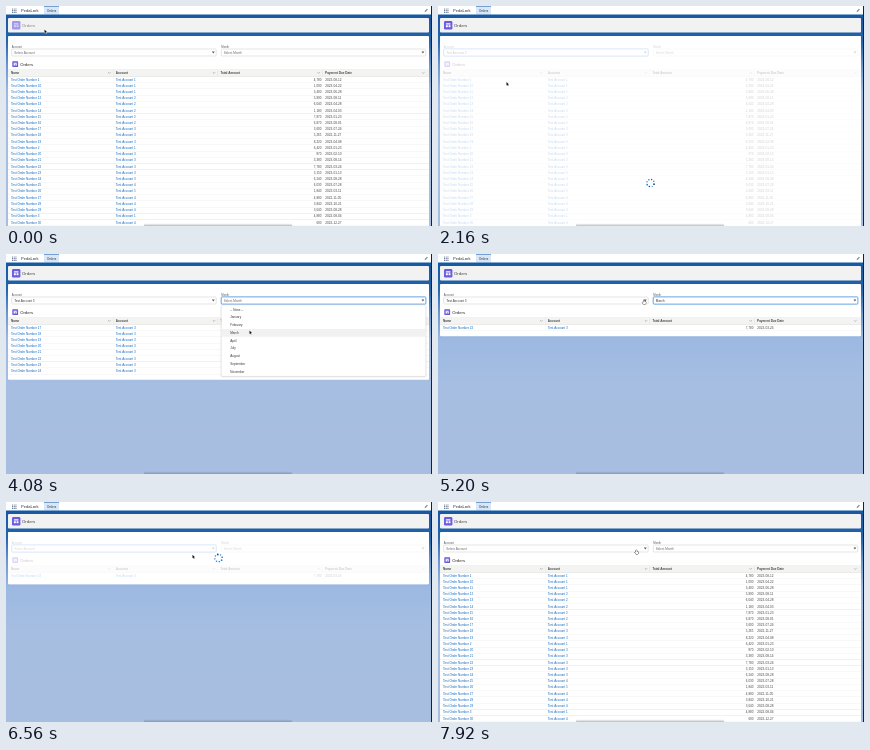
These frames come from a looping animation (426 px wide and 220 px high, 8000 ms). An HTML page with a canvas:

```html
<!DOCTYPE html>
<html lang="en">
<head>
<meta charset="utf-8">
<title>Orders</title>
<style>
  html, body { margin: 0; width: 100%; height: 100%; overflow: hidden; background: #fff; }
  canvas { display: block; width: 426px; height: 220px; }
</style>
</head>
<body>
<canvas id="stage" width="426" height="220"></canvas>
<script>
const ctx = document.getElementById('stage').getContext('2d');
const LOOP = 8000;
const FONT = '"Liberation Sans", Arial, sans-serif';
const LINK = '#0b66c0', INK = '#444', PURPLE = '#6a5cdf', LINE = '#dddbda';
const ROW = 6.22, OPTION = 7.75;

// Order numbers come sorted as text: 1, 10, 11, ..., 2, 20, ...
const amounts = [4780, 1000, 3400, 5890, 6040, 1180, 7870, 6870, 3600, 5265, 8220, 6420,
  870, 3380, 7780, 3150, 6240, 6030, 1840, 4880, 3840, 3640, 4880, 600];
const dates = ('23-08-12 23-04-22 23-06-28 23-08-11 23-04-28 23-04-03 23-01-23 23-08-01 ' +
  '23-07-24 22-11-27 23-04-08 23-01-23 23-02-10 23-08-14 23-03-24 23-01-13 23-08-28 ' +
  '23-07-28 23-03-11 22-11-05 23-10-21 23-08-28 22-08-04 22-12-27').split(' ');
const accountOf = n => n < 12 ? 1 : n < 17 ? 2 : n < 25 ? 3 : n === 26 ? 5 : 4;
const orders = Array.from({ length: 30 }, (_, i) => String(i + 1)).sort()
  .slice(0, amounts.length)
  .map((n, i) => ({
    name: 'Test Order Number ' + n,
    account: accountOf(+n),
    amount: amounts[i].toLocaleString('en-US'),
    date: '20' + dates[i]
  }));
const byAccount = orders.filter(o => o.account === 3);
const byMonth = byAccount.filter(o => o.date.slice(5, 7) === '03');

const accounts = ['-- None --', ...[1, 2, 3, 4, 5].map(n => 'Test Account ' + n)];
const months = ['-- None --', 'January', 'February', 'March', 'April', 'July',
  'August', 'September', 'November'];

// Pointer stops: time, x, y
const path = [
  [0, 38.5, 23.5], [80, 38.5, 23.5], [800, 73, 46], [1120, 73, 46], [1680, 68.5, 76],
  [2400, 68.5, 76], [2900, 220.5, 46], [3360, 220.5, 46], [3840, 243.5, 76.5],
  [4440, 243.5, 76.5], [5120, 205.5, 46], [5440, 205.5, 46], [5960, 186.5, 52.8],
  [6960, 186.5, 52.8], [7600, 198, 48], [LOOP, 198, 48]
];

const within = (t, a, b) => t >= a && t < b;
const ease = p => p * p * (3 - 2 * p);

function pointerAt(t) {
  const i = path.findIndex(p => p[0] > t);
  const [t0, x0, y0] = path[i - 1], [t1, x1, y1] = path[i];
  const p = ease((t - t0) / (t1 - t0));
  return [x0 + (x1 - x0) * p, y0 + (y1 - y0) * p];
}

function stateAt(t) {
  return {
    rows: within(t, 2480, 4400) ? byAccount : within(t, 4400, 6880) ? byMonth : orders,
    account: within(t, 1880, 6240) ? 'Test Account 3' : 'Select Account',
    month: within(t, 4160, 6240) ? 'March' : 'Select Month',
    focus: within(t, 1040, 3280) || within(t, 5360, 7360) ? 'account'
      : within(t, 3280, 5360) ? 'month' : '',
    open: within(t, 1040, 1880) || within(t, 5360, 6240) ? 'account'
      : within(t, 3280, 4160) ? 'month' : '',
    loading: within(t, 1880, 2480) || within(t, 4160, 4400) || within(t, 6240, 6880)
  };
}

function rect(x, y, w, h, fill, r = 0, stroke, weight = 0.4) {
  ctx.beginPath();
  ctx.roundRect(x, y, w, h, r);
  if (fill) { ctx.fillStyle = fill; ctx.fill(); }
  if (stroke) { ctx.strokeStyle = stroke; ctx.lineWidth = weight; ctx.stroke(); }
}

// Type is set large and scaled down so tiny sizes keep true widths.
function text(str, x, y, size, color, { bold = false, align = 'left' } = {}) {
  ctx.save();
  ctx.translate(x, y);
  ctx.scale(0.1, 0.1);
  ctx.font = `${bold ? 'bold ' : ''}${size * 10}px ${FONT}`;
  ctx.textAlign = align;
  ctx.fillStyle = color;
  ctx.fillText(str, 0, 0);
  ctx.restore();
}

function polygon(points, fill, stroke, weight = 0.5) {
  ctx.beginPath();
  points.forEach(([x, y]) => ctx.lineTo(x, y));
  ctx.closePath();
  if (stroke) { ctx.strokeStyle = stroke; ctx.lineWidth = weight; ctx.stroke(); }
  ctx.fillStyle = fill;
  ctx.fill();
}

function icon(x, y, s, color) {
  rect(x, y, s, s, color, s * 0.15);
  rect(x + s * 0.22, y + s * 0.27, s * 0.56, s * 0.16, '#fff', s * 0.05);
  rect(x + s * 0.22, y + s * 0.5, s * 0.24, s * 0.24, '#fff', s * 0.05);
  rect(x + s * 0.54, y + s * 0.5, s * 0.24, s * 0.24, '#fff', s * 0.05);
}

function backdrop() {
  const g = ctx.createLinearGradient(0, 0, 0, 220);
  [[0, '#15549c'], [0.16, '#2264ad'], [0.27, '#6c96cf'], [0.39, '#9db9e2'],
    [0.6, '#a6bee1'], [1, '#a8bee0']].forEach(([p, c]) => g.addColorStop(p, c));
  rect(0, 0, 426, 220, g);
}

function navBar() {
  rect(0, 0, 426, 9, '#fff');
  for (let i = 0; i < 9; i++) {
    rect(6 + (i % 3) * 1.7, 2.4 + Math.floor(i / 3) * 1.7, 1.1, 1.1, '#5f6f8c', 0.5);
  }
  text('PedaLark', 15, 6, 4.1, '#333');
  rect(38, 0, 15, 8.5, '#d8e6f6');
  rect(38, 0, 15, 0.7, '#4b83c8');
  text('Orders', 41, 5.6, 3, '#333');
  polygon([[418.6, 6], [418.9, 4.9], [421, 2.8], [421.8, 3.6], [419.7, 5.7]], '#777');
  rect(0, 8.5, 426, 0.8, '#0d5aa8');
}

function pageHeader(t) {
  rect(2, 12, 421, 14.5, '#f3f2f3', 1);
  ctx.globalAlpha = t < 80 ? 0.6 : 1;
  icon(6, 15, 8.4, PURPLE);
  text('Orders', 16, 20.9, 4.3, '#3e3e3c');
  ctx.globalAlpha = 1;
}

function select(x, label, value, focused) {
  text(label, x, 41.8, 2.8, '#555');
  if (focused) rect(x, 43, 204.5, 7, null, 1, 'rgba(60,140,225,.35)', 1.4);
  rect(x, 43, 204.5, 7, '#fff', 1, focused ? '#1b76d0' : '#cbc9c8', 0.5);
  text(value, x + 2.5, 47.5, 3.1, value.startsWith('Select') ? '#666' : '#333');
  polygon([[x + 200.2, 45.6], [x + 203, 45.6], [x + 201.6, 47.4]], '#555');
}

function table(rows) {
  rect(2, 63.6, 421, 6.6, '#f3f3f2');
  rect(2, 63.4, 421, 0.4, LINE);
  rect(2, 70, 421, 0.4, LINE);
  ['Name', 'Account', 'Total Amount', 'Payment Due Date'].forEach((title, i) => {
    const x = 5 + i * 104.7;
    text(title, x, 67.9, 3.05, INK, { bold: true });
    ctx.beginPath();
    ctx.moveTo(x + 97.2, 66.3);
    ctx.lineTo(x + 98.3, 67.4);
    ctx.lineTo(x + 99.4, 66.3);
    ctx.strokeStyle = '#777';
    ctx.lineWidth = 0.5;
    ctx.stroke();
    if (i < 3) rect(x + 102, 63.6, 0.3, 6.6, LINE);
  });
  rows.forEach((o, i) => {
    const y = 74.5 + i * ROW;
    text(o.name, 5, y, 3.05, LINK);
    text('Test Account ' + o.account, 109.7, y, 3.05, LINK);
    text(o.amount, 315.5, y, 3.05, INK, { align: 'right' });
    text(o.date, 319.2, y, 3.2, INK);
    rect(2, y + 2, 421, 0.3, '#e4e3e2');
  });
}

function menu(x, items, pointerY) {
  const h = items.length * OPTION + 1.6;
  ctx.save();
  ctx.shadowColor = 'rgba(0,0,0,.2)';
  ctx.shadowBlur = 1.5;
  ctx.shadowOffsetY = 0.5;
  rect(x, 51, 204.5, h, '#fff', 1);
  ctx.restore();
  rect(x, 51, 204.5, h, null, 1, LINE);
  const hover = Math.floor((pointerY + 0.5 - 51.8) / OPTION);
  items.forEach((item, i) => {
    const y = 51.8 + i * OPTION;
    if (i === hover) rect(x + 0.3, y, 203.9, OPTION, '#f1f1f1');
    text(item, x + 9, y + 4.9, 3.05, '#333');
  });
}

function spinner(x, y, t) {
  const turn = t / 1200 * Math.PI * 2;
  for (let i = 0; i < 8; i++) {
    const a = turn + i * Math.PI / 4;
    ctx.beginPath();
    ctx.arc(x + Math.cos(a) * 3.7, y + Math.sin(a) * 3.7, 0.65 + 0.25 * (i % 3) / 2, 0, 7);
    ctx.fillStyle = i % 2 ? '#1589ee' : '#16498c';
    ctx.fill();
  }
}

function pointer(t, x, y, open) {
  const overSelect = !open && y > 43 && y < 50;
  ctx.save();
  ctx.translate(x, y);
  if (overSelect) {
    polygon([[0, 0], [0.7, 0], [0.8, 1.5], [2.4, 1.9], [2.3, 3.3], [1.8, 4.2],
      [0, 4.2], [-1.1, 2.6], [-0.8, 2.1], [0, 2.6]], '#fff', '#222', 0.8);
  } else {
    polygon([[0, 0], [0, 3.5], [0.8, 2.8], [1.4, 4.1], [2, 3.8], [1.4, 2.6], [2.5, 2.5]],
      '#111', '#fff', 0.6);
  }
  ctx.restore();
}

function dock() {
  const g = ctx.createLinearGradient(0, 217.2, 0, 220);
  g.addColorStop(0, 'rgba(80,90,110,0)');
  g.addColorStop(1, 'rgba(80,90,110,.38)');
  rect(138, 217.2, 148, 5, g, 2);
}

function draw(t) {
  const s = stateAt(t);
  const [px, py] = pointerAt(t);
  const bottom = s.rows === orders ? 324 : 73.5 + (s.rows.length - 1) * ROW + 8.7;

  backdrop();
  navBar();
  pageHeader(t);
  rect(2, 30, 421, bottom - 30, '#fff', 1);
  select(5.7, 'Account', s.account, s.focus === 'account');
  select(215.3, 'Month', s.month, s.focus === 'month');
  icon(6.3, 55.2, 5.8, PURPLE);
  text('Orders', 14.2, 59.5, 4.2, '#222');
  table(s.rows);
  if (s.loading) {
    rect(2, 30, 421, bottom - 30, 'rgba(255,255,255,.75)', 1);
    spinner(212.5, (30 + bottom) / 2, t);
  }
  if (s.open === 'account') menu(5.7, accounts, py);
  if (s.open === 'month') menu(215.3, months, py);
  dock();
  rect(425, 0, 1, 220, '#14213a');
  pointer(t, px, py, s.open);
}

const start = performance.now();
function tick() {
  draw((performance.now() - start) % LOOP);
  requestAnimationFrame(tick);
}
tick();
</script>
</body>
</html>
```
